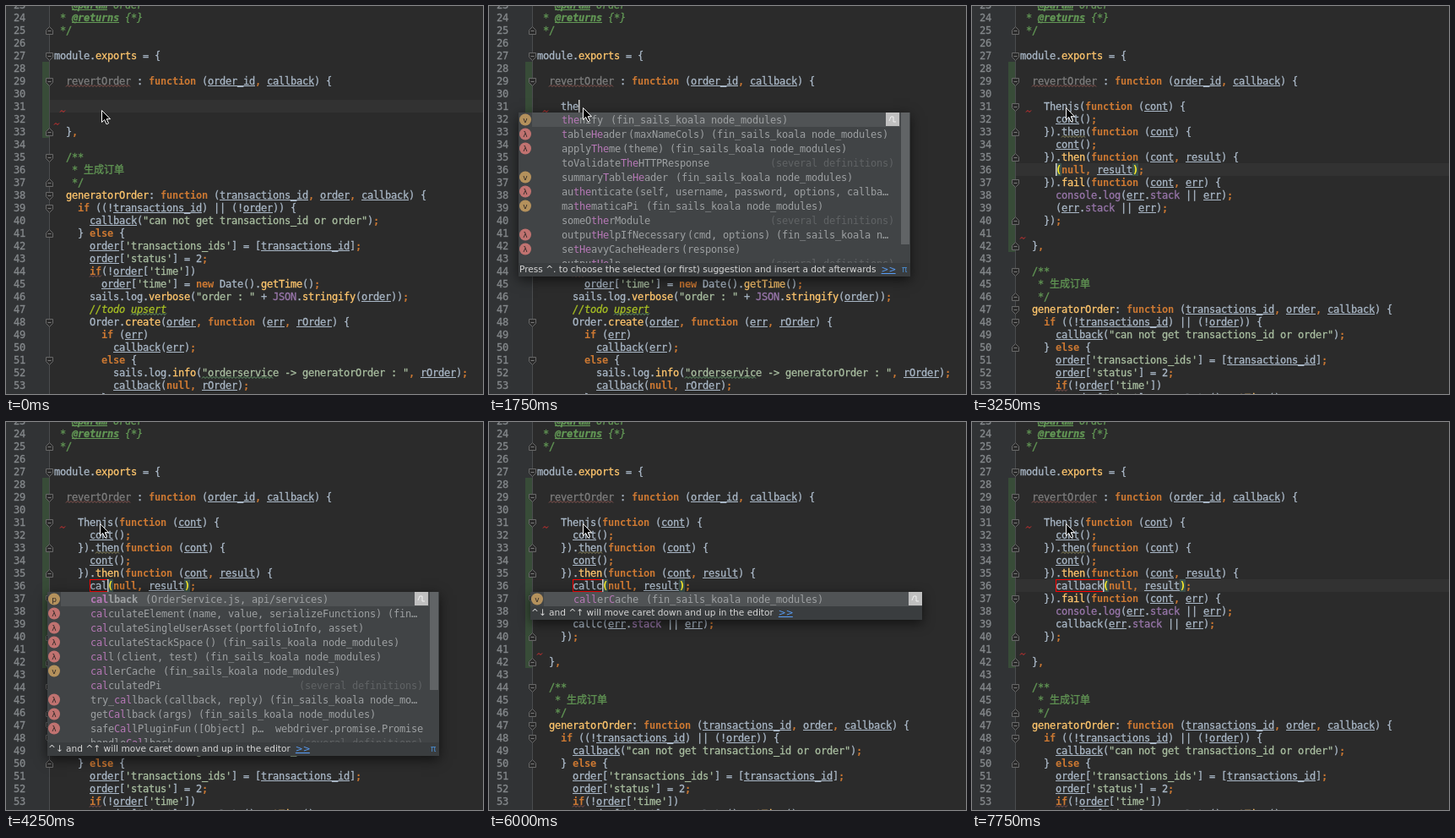
Animation of 565 by 459 pixels, one loop 8000 ms. Source, as an HTML page with a canvas:

```html
<!DOCTYPE html>
<html lang="en">
<head>
<meta charset="utf-8">
<title>Code completion</title>
<style>
html, body { margin: 0; width: 100%; height: 100%; overflow: hidden; background: #2b2b2b; }
canvas { display: block; }
</style>
</head>
<body>
<canvas id="stage" width="565" height="459"></canvas>
<script>
const ctx = document.getElementById('stage').getContext('2d');
const MONO = '12px "DejaVu Sans Mono", "Noto Sans CJK SC", monospace';
const SANS = '10.6px "DejaVu Sans", sans-serif';
const LOOP = 8000, TICK = 250, CELL = 7, ROW = 15, LEFT = 57, ITEM = 17;
const C = {
  text: '#a9b7c6', key: '#cc7832', str: '#a9bea0', fn: '#ffc66d', prop: '#9876aa',
  doc: '#629755', todo: '#a8c023', unused: '#7d7d7d', red: '#e03030', typo: '#659c6b'
};

// The first character of a line is its fold mark: v opens, ^ closes.
const HEAD = `  * @param order
  * @returns {*}
^ */
 
vmodule.exports = {
 
v  revertOrder : function (order_id, callback) {
 `.split('\n');
const TAIL = `^  },
 
v  /**
    * 生成订单
^   */
v  generatorOrder: function (transactions_id, order, callback) {
v    if ((!transactions_id) || (!order)) {
       callback("can not get transactions_id or order");
^    } else {
       order['transactions_ids'] = [transactions_id];
       order['status'] = 2;
       if(!order['time'])
         order['time'] = new Date().getTime();
       sails.log.verbose("order : " + JSON.stringify(order));
       //todo upsert
v      Order.create(order, function (err, rOrder) {
         if (err)
           callback(err);
v        else {
           sails.log.info("orderservice -> generatorOrder : ", rOrder);
           callback(null, rOrder);
         }`.split('\n');

// A leading ~ marks a plain word without colour or underline.
const template = word => `v    Thenjs(function (cont) {
       cont();
^    }).~then(function (cont) {
       cont();
^    }).then(function (cont, result) {
       ~${word}(null, result);
v    }).fail(function (cont, err) {
       console.log(err.stack || err);
       ~${word}(err.stack || err);
^    });
 `.split('\n');

// Each suggestion: icon, text and an optional note on the right.
const MANY = '(several definitions)', MODS = ' (fin_sails_koala node_modules)';
const THE = [
  ['v', 'thenify' + MODS],
  ['λ', 'tableHeader(maxNameCols)' + MODS],
  ['λ', 'applyTheme(theme)' + MODS],
  ['', 'toValidateTheHTTPResponse', MANY],
  ['v', 'summaryTableHeader' + MODS],
  ['λ', 'authenticate(self, username, password, options, callba…'],
  ['v', 'mathematicaPi' + MODS],
  ['', 'someOtherModule', MANY],
  ['λ', 'outputHelpIfNecessary(cmd, options) (fin_sails_koala n…'],
  ['λ', 'setHeavyCacheHeaders(response)'],
  ['', 'outputHelp', MANY]
];
const CALLBACK = ['p', 'callback (OrderService.js, api/services)'];
const TRY = ['λ', 'try_callback(callback, reply) (fin_sails_koala node_mo…'];
const GET = ['λ', 'getCallback(args)' + MODS];
const HANDLE = ['', 'handleCallback', MANY];
const CAL = [
  CALLBACK,
  ['λ', 'calculateElement(name, value, serializeFunctions) (fin…'],
  ['λ', 'calculateSingleUserAsset(portfolioInfo, asset)'],
  ['λ', 'calculateStackSpace()' + MODS],
  ['λ', 'call(client, test)' + MODS],
  ['v', 'callerCache' + MODS],
  ['', 'calculatedPi', MANY],
  TRY, GET,
  ['λ', 'safeCallPluginFun([Object] p…', 'webdriver.promise.Promise'],
  HANDLE
];
const CALLB = [
  CALLBACK, ['', 'callbackAsync', MANY], ['', 'callbacks', MANY], TRY,
  ['', '$$asyncCallback', MANY], GET, HANDLE, ['m', 'jsonpCallback()'], HANDLE
];
const PRESS = 'Press ^. to choose the selected (or first) suggestion and insert a dot afterwards';
const MOVE = '^↓ and ^↑ will move caret down and up in the editor';

// Typed words, one per tick.
const FIRST = { at: 5, words: 't th the then thenj thenjs'.split(' ') };
const SECOND = {
  at: 15,
  words: ('c ca cal call call callc callca callcab callca callc ' +
    'call call callb callb callb callback').split(' ')
};
const INSERT = 11;

const typed = (seq, k) => k < seq.at ? '' : seq.words[Math.min(k - seq.at, seq.words.length - 1)];
const mid = line => 14 + (line - 24) * ROW;
const colX = col => LEFT + col * CELL;

function box(x, y, w, h, color) {
  ctx.fillStyle = color;
  ctx.fillRect(x, y, w, h);
}

// The weight thickens the strokes a little, like soft screen smoothing.
function put(s, x, y, color, style = '', weight = .3) {
  ctx.font = style + ' ' + MONO;
  ctx.fillStyle = ctx.strokeStyle = color;
  ctx.lineWidth = weight;
  for (const ch of s) {
    ctx.fillText(ch, x, y);
    if (weight) ctx.strokeText(ch, x, y);
    x += ch > '\u2e80' ? 12 : CELL;
  }
  return x;
}

function path(points, color, fill) {
  ctx.beginPath();
  points.forEach(([x, y]) => ctx.lineTo(x, y));
  if (fill) {
    ctx.closePath();
    ctx.fillStyle = fill;
    ctx.fill();
  }
  ctx.strokeStyle = color;
  ctx.lineWidth = 1;
  ctx.stroke();
}

function wave(line, col, len, color) {
  const pts = [];
  for (let x = 0; x <= len * CELL; x += 2) pts.push([colX(col) + x, mid(line) + (x % 4 ? 4.5 : 6.5)]);
  path(pts, color);
}

const TOKEN = /~\w*|"[^"]*"|'[^']*'|\/\/.*|\w+|\s+|[^\w\s]/g;
const KEYS = /^(function|if|else|new|null|[,;])$/;
const CALLS = /^(exports|generatorOrder|create|getTime|then|fail|verbose|info|stringify)$/;
const PROPS = /^(console|JSON|stack)$/;
const LOCALS = /^(transactions_id|order|callback|order_id|err|rOrder|cont|result)$/;

function drawCode(code, line) {
  const y = mid(line) + 4;
  let x = LEFT;
  if (/^\s*(\/\*|\*)/.test(code)) {
    for (const part of code.split(/(@\w+)/)) {
      const from = x, tag = part[0] === '@';
      x = put(part, x, y, C.doc, tag ? 'italic bold' : /[{a-z]/.test(part) ? 'italic' : '');
      if (tag) box(from, y + 1, x - from, 1, C.doc);
    }
    return;
  }
  for (const t of code.match(TOKEN) || []) {
    const from = x;
    if (t[0] === '~') x = put(t.slice(1), x, y, C.text);
    else if (t.startsWith('//')) x = put(t, x, y, C.todo, 'italic');
    else if (/^["']/.test(t)) x = put(t, x, y, C.str);
    else if (KEYS.test(t)) x = put(t, x, y, C.key, 'bold', 0);
    else if (CALLS.test(t)) x = put(t, x, y, C.fn);
    else if (PROPS.test(t) || t === 'log' && code.includes('console')) x = put(t, x, y, C.prop);
    else if (t === 'revertOrder') x = put(t, x, y, C.unused);
    else x = put(t, x, y, C.text);
    if (LOCALS.test(t)) box(from, y + 1, x - from, 1, C.text);
  }
}

function drawFold(mark, line) {
  const y = mid(line) + .5, s = mark === 'v' ? 1 : -1, x = 51.5;
  path([[x - 4, y - 4 * s], [x + 4, y - 4 * s], [x + 4, y + s], [x, y + 5 * s], [x - 4, y + s], [x - 4, y - 4 * s]],
    '#686868', '#2b2b2b');
  path([[x - 2, y], [x + 2, y]], '#7a7a7a');
}

// Ranges of a name that match the typed prefix, whole or split at a capital.
function match(name, prefix) {
  const low = name.toLowerCase();
  for (let n = prefix.length; n > 0; n--) {
    const i = low.indexOf(prefix.slice(0, n));
    const rest = prefix.slice(n), tail = rest && rest[0].toUpperCase() + rest.slice(1);
    const j = i < 0 ? -1 : name.indexOf(tail, i + n);
    if (j >= 0) return [[i, n], [j, tail.length]];
  }
  return null;
}

const nameOf = s => s.split(/[ (]/)[0];
const matching = (list, prefix) => list.filter(it => match(nameOf(it[1]), prefix));
const ICON = { v: '#b4915c', p: '#b4915c', 'λ': '#c07270', m: '#c07270' };

function drawPopup({ x, y, items, prefix, hint }) {
  const long = items.length > 10, single = items.length === 1;
  const h = long ? 178 : items.length * ITEM;
  ctx.save();
  ctx.shadowColor = 'rgba(0,0,0,.6)';
  ctx.shadowBlur = 14;
  ctx.shadowOffsetY = 4;
  box(x, y, 464, h + 16, '#3c3f41');
  ctx.restore();

  ctx.save();
  ctx.beginPath();
  ctx.rect(x, y, 464, h);
  ctx.clip();
  box(x, y, 464, h, '#414446');
  box(x + 16, y, single ? 448 : 436, ITEM, '#505355');
  items.forEach(([icon, text, note], i) => {
    const cy = y + 8.5 + i * ITEM, base = Math.round(cy + 4);
    if (icon) {
      ctx.beginPath();
      ctx.arc(x + 8, cy, 7, 0, 7);
      ctx.fillStyle = ICON[icon];
      ctx.fill();
      ctx.font = '9px "DejaVu Sans", sans-serif';
      ctx.textAlign = 'center';
      ctx.fillStyle = '#2e2826';
      ctx.fillText(icon, x + 8, cy + 3);
      ctx.textAlign = 'left';
    }
    const name = nameOf(text), style = icon === 'p' ? 'bold' : '';
    const end = put(name, x + 51, base, '#9da0a2', style, 0);
    put(text.slice(name.length), end + 2, base, '#9da0a2', '', 0);
    for (const [from, n] of match(name, prefix)) {
      const px = x + 51 + from * CELL;
      box(px, base - 11, n * CELL, 15, i ? '#414446' : '#505355');
      put(text.substr(from, n), px, base, '#b678b6', style, 0);
    }
    if (note) put(note, x + 445 - note.length * CELL, base, note === MANY ? '#606365' : '#9da0a2', '', 0);
  });
  if (long || single) {
    const bx = x + (single ? 448 : 435);
    box(bx, y, 16, 16, '#c0c0c0');
    path([[bx + 4, y + 10], [bx + 6, y + 5], [bx + 9, y + 5], [bx + 9, y + 11], [bx + 12, y + 11]], '#efefef');
  }
  if (long) box(x + 453, y, 10, prefix[0] === 't' ? 156 : 116, '#616466');
  ctx.restore();

  box(x, y + h, 464, 16, '#3a3d3f');
  ctx.font = SANS;
  ctx.fillStyle = '#d6d6d6';
  ctx.fillText(hint, x + 1, y + h + 11);
  const lx = x + 7 + ctx.measureText(hint).width;
  ctx.fillStyle = '#589df6';
  ctx.fillText('>>', lx, y + h + 11);
  box(lx, y + h + 12, 17, 1, '#589df6');
  ctx.fillStyle = '#4a88c7';
  if (!single) ctx.fillText('π', x + 454, y + h + 11);
}

function drawPointer(x, y) {
  path([[0, 0], [0, 14], [3.2, 11], [5.6, 16.3], [8, 15.2], [5.7, 10.2], [10, 10.2]]
    .map(([a, b]) => [x + a + .5, y + b + .5]), '#fff', '#000');
}

// The open suggestion list at tick k, if any.
function popupAt(k, first, second) {
  const late = second === 'callb';
  const popup = k < INSERT
    ? { x: 35, y: 126, items: first && matching(THE, first), prefix: first, hint: PRESS }
    : {
      x: 49, y: 201, items: second && k < 30 && matching(late ? CALLB : CAL, second),
      prefix: second, hint: late ? PRESS : MOVE
    };
  return popup.items && popup.items.length ? popup : null;
}

function draw(k) {
  const inserted = k >= INSERT;
  const first = typed(FIRST, k), second = typed(SECOND, k);
  const popup = popupAt(k, first, second);
  const lines = [...HEAD, ...(inserted ? template(second) : ['     ~' + first, ' ']), ...TAIL];
  const current = inserted ? 36 : 31, shift = inserted ? 9 : 0;
  const caretX = inserted ? colX(6 + second.length) : colX(4 + first.length);
  const top = mid(current) - 8;

  box(0, 0, 565, 459, '#2b2b2b');
  box(0, 0, 51, 459, '#313335');
  if (!popup) box(52, top, 513, ROW, '#323232');
  box(43, 66, 8, inserted ? 225 : 90, '#384c38');
  box(51, 0, 1, 459, '#4b4d4f');

  lines.forEach((s, i) => {
    const line = 23 + i;
    if (mid(line) > 470) return;
    if (line < 54) put(String(line), 9, mid(line) + 4, '#84888b');
    if (s[0] !== ' ') drawFold(s[0], line);
    drawCode(s.slice(1), line);
  });

  wave(29, 2, 11, '#8a5550');
  wave(31, 1, 1, C.red);
  wave(32 + shift, 0, 1, C.red);
  wave(44 + shift, 6, 2, '#8a5550');
  wave(47 + shift, 13, 6, C.typo);
  wave(52 + shift, 25, 12, C.typo);
  if (k >= 13) wave(33, 7, 4, '#8f8a5c');

  if (inserted) {
    if (k >= 12) {
      [['(', 0], [')', 13]].forEach(([ch, off]) => {
        const x = caretX + off * CELL;
        box(x, top, CELL, ROW, '#3b514d');
        put(ch, x, mid(current) + 4, '#ffef28', 'bold', 0);
      });
    }
    if (second) {
      ctx.strokeStyle = '#f00';
      ctx.lineWidth = 1;
      ctx.strokeRect(99.5, top + .5, caretX - 99, 14);
    }
  }
  if (k >= 1) box(caretX, top, 1.5, ROW, '#d0d0d0');

  if (popup) drawPopup(popup);
  if (k < 2) drawPointer(113, 123);
  else drawPointer(111, 120);
}

function loop() {
  draw(Math.floor(performance.now() % LOOP / TICK));
  requestAnimationFrame(loop);
}
loop();
</script>
</body>
</html>
```
